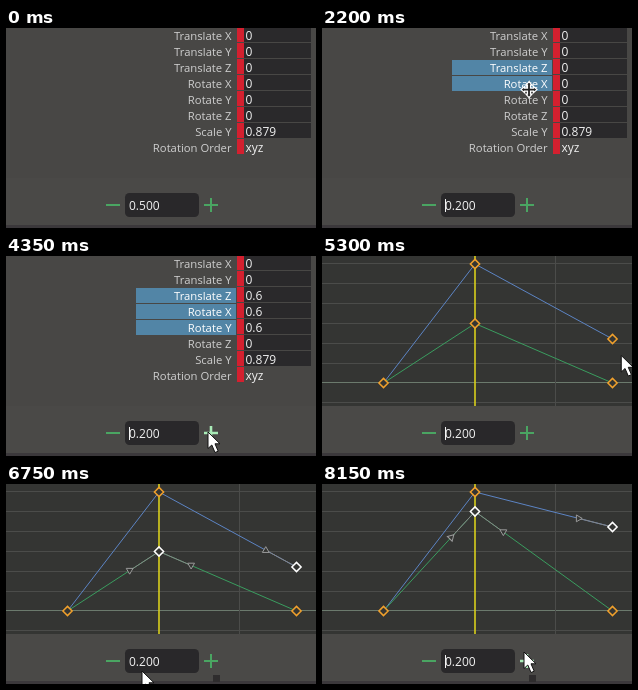
Recreate the animation shown at these times as an HTML page. Size 310 by 200 pixels, loop 8200 ms.

```html
<!DOCTYPE html>
<html lang="en">
<head>
<meta charset="utf-8">
<title>Channel nudge</title>
<style>
html, body { margin: 0; width: 100%; height: 100%; overflow: hidden; background: #484745; }
svg { display: block; width: 310px; height: 200px; }
text { font-family: "Open Sans", "Noto Sans", sans-serif; }
.label { font-size: 11.3px; fill: #cfcfcf; text-anchor: end; }
.value { font-size: 12px; fill: #f0f0f0; }
</style>
</head>
<body>
<svg id="stage" viewBox="0 0 310 200"></svg>
<script>
const LOOP = 8200, STEP = 50;
const stage = document.getElementById('stage');

function add(parent, tag, attrs, text) {
  const el = document.createElementNS('http://www.w3.org/2000/svg', tag);
  set(el, attrs);
  if (text !== undefined) el.textContent = text;
  parent.appendChild(el);
  return el;
}
function set(el, attrs) {
  for (const k in attrs) el.setAttribute(k, attrs[k]);
}
function show(el, on) {
  el.style.display = on ? '' : 'none';
}
function rect(parent, x, y, width, height, fill, rx = 0) {
  return add(parent, 'rect', { x, y, width, height, fill, rx });
}
function line(parent, stroke, width = 1, d = '') {
  return add(parent, 'path', { d, stroke, 'stroke-width': width, fill: 'none' });
}

rect(stage, 0, 0, 310, 200, '#484745');

// Channel list
const channels = add(stage, 'g', {});
const names = ['Translate X', 'Translate Y', 'Translate Z', 'Rotate X',
  'Rotate Y', 'Rotate Z', 'Scale Y', 'Rotation Order'];
const rows = names.map((name, i) => {
  const y = i * 16, last = i === 7;
  const back = rect(channels, 130, y, 100, 15, '#5285a6');
  rect(channels, 231, y - 1, 7, 15, '#d3202f');
  if (!last) rect(channels, 238, y - 1, 67, 15, '#2a292b');
  const label = add(channels, 'text', { x: 225.5, y: y + 12, class: 'label' }, name);
  const start = last ? 'xyz' : i === 6 ? '0.879' : '0';
  const value = add(channels, 'text', { x: 239.5, y: y + 11.5, class: 'value' }, start);
  return { back, label, value };
});

// Curve graph
const graph = add(stage, 'g', {});
rect(graph, 0, 0, 310, 150, '#343533');
for (let i = 0; i < 8; i++) {
  const y = Math.round(8 + i * 19.9) - 0.5;
  line(graph, i === 6 ? '#6b7a6d' : '#4b4c4a', 1, `M0 ${y}H310`);
}
line(graph, '#4b4c4a', 1, 'M233.5 0V150');
const blue = line(graph, '#5c84c4');
const green = line(graph, '#3a9d5f');
const tangents = line(graph, '#858585');
line(graph, '#d9d01c', 1.6, 'M153 0V150');
const handles = [0, 1, 2].map(() => add(graph, 'path', {
  d: 'M3.6 0L-2.2 3.4V-3.4Z', fill: '#343533', stroke: '#9a9a9a'
}));
const keys = [0, 1, 2, 3, 4].map(() => add(graph, 'path', {
  d: 'M0 -4.6L4.6 0L0 4.6L-4.6 0Z', fill: '#343533', 'stroke-width': 1.5
}));
const marquee = add(graph, 'rect', {
  fill: 'none', stroke: '#fff', 'stroke-dasharray': '3 2'
});

// Step field
rect(stage, 0, 150, 310, 47, '#4a4947');
rect(stage, 0, 197, 310, 3, '#3b383b');
rect(stage, 119, 165, 74, 24, '#29282a', 4.5);
line(stage, '#4aa562', 2, 'M100 177H114');
const plus = line(stage, '#4aa562', 2, 'M198 177H212M205 170V184');
const amount = add(stage, 'text', { x: 123, y: 182, class: 'value' });
const caret = line(stage, '#f4f4f4', 1, 'M123.5 171V184');
const grip = rect(stage, 207, 191, 7, 7, '#2f2d2e');

// Pointers
const arrow = add(stage, 'path', {
  d: 'M0 0V16.5L3.8 13L7 20.5L10.2 19.2L7 11.8H12Z',
  fill: '#fff', stroke: '#111', 'stroke-width': 1
});
const cross = add(stage, 'path', {
  d: 'M0 -8L3 -4.5H1.5V-1.5H4.5V-3L8 0L4.5 3V1.5H1.5V4.5H3L0 8L-3 4.5H-1.5V1.5H-4.5V3L-8 0L-4.5 -3V-1.5H-1.5V-4.5H-3Z',
  fill: '#222', stroke: '#fff', 'stroke-width': 1.2
});

// Each track: points of time, x, y; the pointer is gone after the last one
const tracks = [
  { points: [[150, 213, 158], [350, 135, 172], [450, 143, 174], [550, 143, 174], [700, 213, 158]] },
  { cross: true, points: [[1650, 296, 38], [1700, 264, 36], [1950, 210, 40],
    [2050, 210, 40], [2300, 205, 76], [2500, 205, 76]] },
  { points: [[2850, 213, 158], [3000, 200, 186], [3200, 202, 176], [5000, 202, 176]] },
  { points: [[5250, 296, 110], [5450, 309, 68], [5500, 309, 68], [5800, 279, 87], [6000, 279, 87]] },
  { points: [[6050, 185, 128], [6150, 167, 48], [6200, 167, 48], [6350, 140, 82], [6450, 140, 82]] },
  { points: [[6750, 136, 187], [7200, 202, 175], [7850, 202, 175], [7900, 202, 168], [8200, 202, 168]] }
];
const presses = [[3650, 3850], [4000, 4200], [4350, 4450], [7400, 7550], [7600, 7750], [7900, 8200]];
const drags = [[5500, 5900, 309, 68], [6200, 6400, 167, 48]];

function pointer(t) {
  const track = tracks.find(({ points: p }) => t >= p[0][0] && t < p[p.length - 1][0]);
  if (!track) return null;
  const p = track.points;
  const i = p.findIndex(q => q[0] > t);
  const [t0, x0, y0] = p[i - 1], [t1, x1, y1] = p[i];
  const k = (t - t0) / (t1 - t0);
  return { x: x0 + (x1 - x0) * k, y: y0 + (y1 - y0) * k, cross: track.cross };
}

function caretOn(t) {
  if (t < 1200 || (t >= 5450 && t < 7150)) return false;
  if (t < 1450) return true;
  if (t < 5450) return t >= 1750 && Math.floor((t - 1200) / 250) % 2 === 0;
  return Math.floor((t - 7150) / 250) % 2 === 0;
}

function drawChannels(t) {
  const clicks = presses.filter(p => p[0] <= t && p[0] < 5000).length;
  rows.forEach((row, i) => {
    const picked = i >= 2 && i <= 4 && t >= 2100 + (i - 2) * 100;
    show(row.back, picked);
    row.label.style.fill = picked ? '#fff' : '';
    if (i >= 2 && i <= 4) row.value.textContent = clicks ? (clicks * 0.2).toFixed(1) : '0';
  });
}

// Point on the way from a to b at a fixed reach
function along(a, b, reach = 35) {
  const dx = b[0] - a[0], dy = b[1] - a[1], k = reach / Math.hypot(dx, dy);
  return [a[0] + dx * k, a[1] + dy * k];
}

function drawGraph(t, at) {
  const rise = 20 * ((t >= 7400) + (t >= 7600));
  const endPicked = t >= 5900, midPicked = t >= 6400;
  const start = [61.5, 127], top = [153, 8], mid = [153, 67.5 - rise];
  const end = [290.5, 83 - rise], low = [290.5, 127];
  set(blue, { d: `M${start}L${top}L${end}` });
  set(green, { d: `M${start}L${mid}L${low}` });

  const ends = [along(mid, start), along(mid, low), along(end, top)];
  const turn = rise === 40 ? [-45, 90, 0] : rise ? [0, 90, -45] : [90, 90, -90];
  handles.forEach((h, i) => {
    show(h, i === 2 ? endPicked : midPicked);
    set(h, { transform: `translate(${ends[i]}) rotate(${turn[i]})` });
  });
  set(tangents, {
    d: (midPicked ? `M${ends[0]}L${mid}L${ends[1]}` : '') + (endPicked ? `M${ends[2]}L${end}` : '')
  });
  [start, top, mid, end, low].forEach((p, i) => {
    const picked = (i === 2 && midPicked) || (i === 3 && endPicked);
    set(keys[i], { transform: `translate(${p})`, stroke: picked ? '#fff' : '#f0a02c' });
  });

  const drag = drags.find(d => t >= d[0] && t < d[1]);
  show(marquee, drag && at);
  if (drag && at) {
    const [, , x, y] = drag;
    set(marquee, { x: at.x + 1.5, y: y + 0.5, width: Math.max(0, x - at.x - 2), height: Math.max(0, at.y - y + 1) });
  }
}

function draw(t) {
  const inGraph = t >= 5200, at = pointer(t);
  show(channels, !inGraph);
  show(graph, inGraph);
  if (inGraph) drawGraph(t, at);
  else drawChannels(t);

  amount.textContent = t < 1200 ? '0.500' : '0.200';
  show(caret, caretOn(t));
  const lit = presses.some(p => t >= p[0] && t < p[1]);
  set(plus, { stroke: lit ? '#a9ebb7' : '#4aa562', 'stroke-width': lit ? 2.6 : 2 });

  show(grip, (t >= 2900 && t < 3200) || (t >= 6750 && t < 7200) || t >= 7900);
  show(arrow, at && !at.cross);
  show(cross, at && at.cross);
  if (at) set(at.cross ? cross : arrow, { transform: `translate(${at.x} ${at.y})` });
}

const begin = performance.now();
function tick() {
  const t = (performance.now() - begin) % LOOP;
  draw(Math.floor(t / STEP) * STEP);
  requestAnimationFrame(tick);
}
tick();
</script>
</body>
</html>
```
